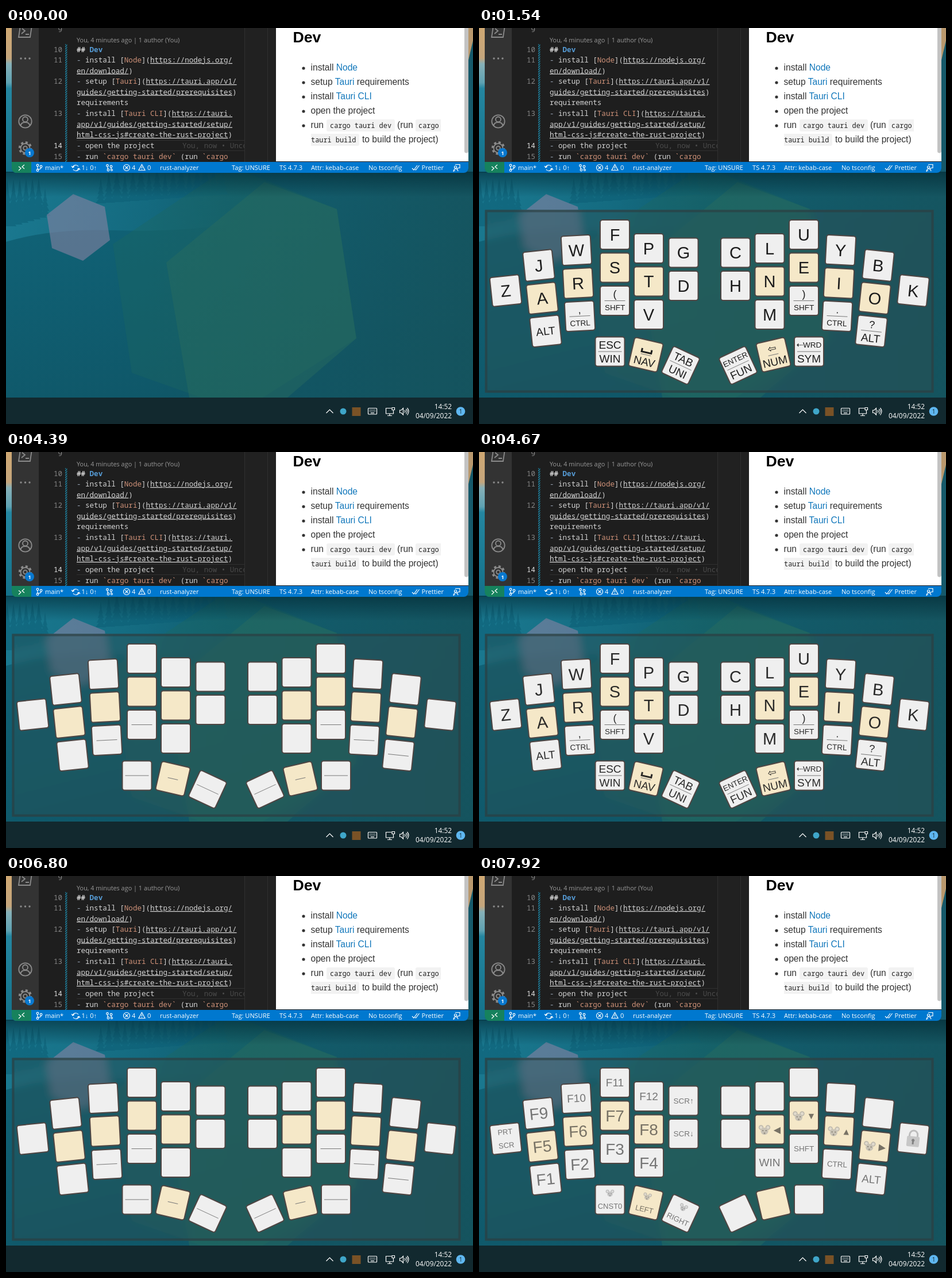
Write an HTML page that moves like this. It is 813 by 689 pixels and loops after 8000 ms.

```html
<!DOCTYPE html>
<html lang="en">
<head>
<meta charset="utf-8">
<title>Keyboard layer overlay</title>
<style>
  html, body { margin: 0; width: 100%; height: 100%; overflow: hidden; background: #0f5768; }
  svg { display: block; width: 100vw; height: 100vh; }
  text { white-space: pre; }
  .ui { font: 500 11.1px "Open Sans", sans-serif; fill: #fff; }
  .code { font: 12.55px "Noto Sans Mono", monospace; fill: #d4d4d4; }
  .num { fill: #858585; text-anchor: end; }
  .dash { fill: #9aa7b8; }
  .name { fill: #ce9178; }
  .url { text-decoration: underline 1px; text-underline-offset: 3px; text-decoration-skip-ink: none; }
  .doc { font: 15.6px "Liberation Sans", Arial, sans-serif; fill: #333; }
  .link { fill: #1177bb; }
  .inline { font: 11.9px "Noto Sans Mono", monospace; fill: #222; }
  .line { fill: none; stroke: #fff; stroke-width: 1.2; }
  .dim { stroke: #8b8b8b; stroke-width: 1.8; }
  .label { font-family: "Liberation Sans", Arial, "DejaVu Sans", sans-serif; fill: #1c1c1c; text-anchor: middle; }
</style>
</head>
<body>
<svg viewBox="0 0 813 689" preserveAspectRatio="none">
  <defs>
    <linearGradient id="sky" x2=".3" y2="1">
      <stop offset="0" stop-color="#13748b"/><stop offset=".5" stop-color="#106175"/><stop offset="1" stop-color="#0f5667"/>
    </linearGradient>
    <linearGradient id="dusk"><stop offset=".3" stop-color="#16535c" stop-opacity="0"/><stop offset="1" stop-color="#16535c" stop-opacity=".8"/></linearGradient>
    <linearGradient id="lake"><stop offset="0" stop-color="#1d7f97" stop-opacity=".75"/><stop offset="1" stop-color="#1d7f97" stop-opacity="0"/></linearGradient>
    <linearGradient id="shade" x2="0" y2="1"><stop offset="0" stop-color="#002530" stop-opacity=".6"/><stop offset="1" stop-color="#002530" stop-opacity="0"/></linearGradient>
    <linearGradient id="edge" x2="0" y2="1"><stop offset="0" stop-color="#cfa873"/><stop offset=".21" stop-color="#c4a57c"/><stop offset=".25" stop-color="#86b0b7"/><stop offset=".38" stop-color="#5fa2b2"/><stop offset=".42" stop-color="#2486a0"/><stop offset="1" stop-color="#14718a"/></linearGradient>
    <pattern id="hatch" width="4" height="4" patternUnits="userSpaceOnUse"><path d="M-1 1L1-1M0 4L4 0M3 5L5 3" stroke="#1b91b4" stroke-width="1.3"/></pattern>
    <filter id="frost" x="0" y="0" width="1" height="1"><feGaussianBlur stdDeviation="7"/></filter>
    <clipPath id="win"><path d="M10 0H805V244a8 8 0 0 1-8 8H18a8 8 0 0 1-8-8Z"/></clipPath>
    <clipPath id="pane"><path d="M57 0H415V233H57Z"/></clipPath>
    <clipPath id="glass"><rect x="10" y="316" width="782" height="319" rx="2"/></clipPath>
  </defs>

  <g id="desktop">
    <path d="M0 0H813V689H0Z" fill="url(#sky)"/>
    <path d="M0 252H400V340Q300 356 190 352T0 372Z" fill="url(#lake)"/>
    <path d="M0 0H813V689H0Z" fill="url(#dusk)"/>
    <path d="M0 0H12V250H0Z" fill="url(#edge)"/>
    <path d="M804 0H813V250H804Z" fill="#16596a"/>
    <path d="M804 0H813V22L804 60Z" fill="#b9986d"/>
    <g id="trees" fill="#0d6077" opacity=".6"></g>
    <path d="M186 376L372 252H420L576 315 610 540 447 643H340L219 600Z" fill="#1e665e" opacity=".36"/>
    <path d="M279 408L450 268 576 315 610 540 490 643H319Z" fill="#286c5e" opacity=".48"/>
    <path d="M117 289L172 311 181 369 134 405 80 383 71 325Z" fill="#8a83a4" opacity=".58"/>
    <path d="M0 250H813V294H0Z" fill="url(#shade)"/>
  </g>

  <!-- editor window -->
  <g clip-path="url(#win)">
    <path d="M10 0H805V252H10Z" fill="#1e1e1e"/>
    <path d="M10 0H57V233H10Z" fill="#333"/>
    <path d="M415 0H469V233H415Z" fill="#212121"/>
    <path d="M415.5 0V233M455.5 0V233" stroke="#303030"/>
    <path d="M470 0H805V232H470Z" fill="#fff"/>
    <path d="M798 0H805V214a3.5 3.5 0 0 1-7 0Z" fill="#c3c3c3"/>
    <path d="M103 28H106.5V233H103Z" fill="url(#hatch)"/>
    <g class="line dim">
      <path d="M25-4H45L42 16H22ZM28 1l5 4-6 5M34 11h6"/>
      <circle cx="33.5" cy="162.5" r="11.2"/><circle cx="33.5" cy="159" r="4.5"/><path d="M25.5 170q1-6 8-6t8 6"/>
      <circle cx="33.5" cy="209" r="3.3"/><circle cx="33.5" cy="209" r="8"/><circle cx="33.5" cy="209" r="10" stroke-width="3.4" stroke-dasharray="3.93"/>
    </g>
    <g fill="#8b8b8b"><circle cx="26" cy="53" r="1.7"/><circle cx="33.5" cy="53" r="1.7"/><circle cx="41" cy="53" r="1.7"/></g>
    <circle cx="41" cy="217" r="8" fill="#0878cf"/>
    <text class="ui" x="38.5" y="220.5" style="font-size:9px;font-weight:700">1</text>

    <g class="code" clip-path="url(#pane)">
      <path d="M123 195.5H415M123 213.5H415" stroke="#303030"/>
      <g class="num">
        <text x="98" y="7">9</text><text x="98" y="41.5">10</text><text x="98" y="60">11</text><text x="98" y="97">12</text>
        <text x="98" y="153">13</text><text x="98" y="208.5" fill="#e0e0e0">14</text><text x="98" y="227.5">15</text>
      </g>
      <text class="ui" x="123" y="25" style="font-size:10.9px;font-weight:400;fill:#999">You, 4 minutes ago | 1 author (You)</text>
      <text x="123" y="41.5" font-weight="700">## <tspan fill="#569cd6">Dev</tspan></text>
      <text x="123" y="60"><tspan class="dash">- </tspan>install [<tspan class="name">Node</tspan>](<tspan class="url">https://nodejs.org/</tspan></text>
      <text x="123" y="78.5"><tspan class="url">en/download/</tspan>)</text>
      <text x="123" y="97"><tspan class="dash">- </tspan>setup [<tspan class="name">Tauri</tspan>](<tspan class="url">https://tauri.app/v1/</tspan></text>
      <text x="123" y="115.5"><tspan class="url">guides/getting-started/prerequisites</tspan>)</text>
      <text x="123" y="134">requirements</text>
      <text x="123" y="153"><tspan class="dash">- </tspan>install [<tspan class="name">Tauri CLI</tspan>](<tspan class="url">https://tauri.</tspan></text>
      <text x="123" y="171.5"><tspan class="url">app/v1/guides/getting-started/setup/</tspan></text>
      <text x="123" y="190"><tspan class="url">html-css-js#create-the-rust-project</tspan>)</text>
      <text x="123" y="208.5"><tspan class="dash">- </tspan>open the project</text>
      <text x="307" y="208.5" fill="#4b4b4b">You, now • Uncommitted</text>
      <text x="123" y="227.5"><tspan class="dash">- </tspan>run <tspan class="name">`cargo tauri dev`</tspan> (run <tspan class="name">`cargo</tspan></text>
    </g>

    <g class="doc">
      <text x="499.5" y="25" style="font-size:26.7px;font-weight:700;fill:#000">Dev</text>
      <g><circle cx="518" cy="70" r="2.6"/><circle cx="518" cy="95" r="2.6"/><circle cx="518" cy="120" r="2.6"/><circle cx="518" cy="145" r="2.6"/><circle cx="518" cy="170" r="2.6"/></g>
      <text x="530.5" y="74">install <tspan class="link">Node</tspan></text>
      <text x="530.5" y="99">setup <tspan class="link">Tauri</tspan> requirements</text>
      <text x="530.5" y="124">install <tspan class="link">Tauri CLI</tspan></text>
      <text x="530.5" y="149">open the project</text>
      <g fill="#f2f2f2"><rect x="558" y="159" width="119" height="21" rx="3"/><path d="M757 159H716a3 3 0 0 0-3 3v15a3 3 0 0 0 3 3h41ZM531 184h81a3 3 0 0 1 3 3v15a3 3 0 0 1-3 3h-81Z"/></g>
      <text x="530.5" y="174">run</text><text class="inline" x="564" y="173.5">cargo tauri dev</text>
      <text x="681" y="174">(run</text><text class="inline" x="718" y="173.5">cargo</text>
      <text class="inline" x="531" y="198.5">tauri build</text><text x="620" y="199">to build the project)</text>
    </g>

    <!-- status bar -->
    <path d="M10 233H805V252H10Z" fill="#0078cf"/>
    <path d="M10 233H44V252H10Z" fill="#16825d"/>
    <g class="line">
      <path d="M22 241l4 3-4 4M32 238l-4 3.5 4 3.5"/>
      <circle cx="55" cy="239" r="1.8"/><circle cx="55" cy="247.5" r="1.8"/><circle cx="61" cy="241" r="1.8"/><path d="M55 241v5q6 0 6-3"/>
      <path d="M116 242a5.5 5 0 0 1 10-1M127 245a5.5 5 0 0 1-10 1M114 240l2 3 3-2M129 247l-2-3-3 2"/>
      <circle cx="176.5" cy="239.5" r="1.8"/><circle cx="183" cy="241" r="1.8"/><circle cx="178" cy="247" r="1.8"/><circle cx="184" cy="247" r="1.5"/><path d="M177 241v4M183 243v3"/>
      <circle cx="210" cy="243" r="5.5"/><path d="M207.5 240.5l5 5m0-5l-5 5"/>
      <path d="M236.5 237.5l5.5 10h-11ZM236.5 241v3M236.5 245v1.2"/>
      <path d="M707 244l3 3 6-8M712 246l1.5 1 6-8"/>
      <path d="M782 237.5h8v6h-3l-2 2M782 248q-3 0-3 2M779 249q1-4 4-4t4 4"/><circle cx="782.5" cy="242" r="2"/>
    </g>
    <g class="ui">
      <text x="68" y="247">main*</text><text x="131.5" y="247">1↓ 0↑</text><text x="219" y="247">4</text><text x="246" y="247">0</text>
      <text x="268" y="247">rust-analyzer</text><text x="393" y="247">Tag: UNSURE</text><text x="476" y="247">TS 4.7.3</text>
      <text x="531" y="247">Attr: kebab-case</text><text x="631" y="247">No tsconfig</text><text x="723.5" y="247">Prettier</text>
    </g>
  </g>

  <!-- taskbar -->
  <path d="M0 643H813V689H0Z" fill="#12292f"/>
  <g class="line">
    <path d="M557.5 670l6-6 6 6"/>
    <rect x="630.5" y="661.5" width="15" height="10.5" rx="1"/><path d="M633 664.5h10M633 667h10" stroke-dasharray="1.5 1.3"/><path d="M635 669.7h6"/>
    <path d="M671 661.5h-9.5v9.5h13v-4M664 674.5h8M668 671v3M672 660.5h4.5v4h-4.5ZM674.3 664.5v3"/>
    <path d="M685.5 665h2.5l3.5-3.5v11.5l-3.5-3.5h-2.5ZM694 665q2 2 0 4.5M696.5 663q3.5 4 0 8.5M698.5 661q5 6 0 12.5"/>
  </g>
  <circle cx="587" cy="667" r="5.5" fill="#3fa6c9"/>
  <rect x="602.5" y="660" width="15" height="15" fill="#7a5226"/>
  <g class="ui" text-anchor="end" style="font-size:11.9px;font-weight:400">
    <text x="776" y="663">14:52</text><text x="776" y="679">04/09/2022</text>
  </g>
  <circle cx="791.5" cy="667" r="7.8" fill="#5fb7f0"/>
  <text class="ui" x="791.5" y="670.7" text-anchor="middle" style="font-size:10px;fill:#12292f">1</text>

  <g id="panel">
    <g clip-path="url(#glass)">
      <use href="#desktop" filter="url(#frost)"/>
      <rect x="10" y="316" width="782" height="319" fill="#2c4f52" fill-opacity=".42"/>
    </g>
    <rect x="12.5" y="318.5" width="777" height="314" fill="none" stroke="#2c3d40" stroke-opacity=".62" stroke-width="4"/>
    <g id="keys"></g>
  </g>
</svg>

<script>
const LOOP = 8000;
const $ = id => document.getElementById(id);

function add(parent, tag, attrs = {}, content = "") {
  const node = document.createElementNS("http://www.w3.org/2000/svg", tag);
  for (const name in attrs) node.setAttribute(name, attrs[name]);
  node.textContent = content;
  return parent.appendChild(node);
}

function tree(x, base, height) {
  let d = "";
  for (let tier = 1; tier <= 5; tier++) {
    const y = base - height + height * tier / 5, w = height * tier * .045;
    d += `M${x} ${y - height * .32}L${x + w} ${y}H${x - w}Z`;
  }
  add($("trees"), "path", { d });
}
for (let i = 0; i < 7; i++) tree(2 + i * 11, 345 - i * 3, 72 - i * 5 + (i * 37 % 17));
for (let i = 0; i < 16; i++) tree(165 + i * 14, 305 - i, 40 + (i * 29 % 21));

// Columns of the left half: x, y, tilt, keys, left x + right x
const fingers = [
  [46.5, 457, -6, 1, 802.5], [104, 413, -6, 3, 799], [169.5, 386.5, -3, 3, 799],
  [236.5, 359.5, 0, 3, 802], [295.5, 383.5, 0, 3, 801.5], [356, 391, 0, 2, 802.5]
];
const thumbs = [[228, 563, 0, 1, 802.5], [290.5, 568.5, 13, 1, 803], [351, 587, 25, 1, 802]];
const mirror = cols => cols.map(([x, y, tilt, n, sum]) => [sum - x, y, -tilt, n]).reverse();
const columns = [...fingers, ...thumbs, ...mirror(fingers), ...mirror(thumbs)];

// "_" is blank, "a|b" has a rule between its halves, "a/b" has none
const layers = {
  base: "Z J A ALT W R ,|CTRL F S (|SHFT P T V G D ESC|WIN space|NAV TAB|UNI " +
        "C H L N M U E )|SHFT Y I .|CTRL B O ?|ALT K ENTER|FUN ⇦|NUM ⇠WRD|SYM",
  nav:  "INS _ _ ALT _ _ CTRL _ _ SHFT _ _ WIN _ _ _ _ _ " +
        "_ _ HOME ◀ _ PGDN ▼ _ PGUP ▲ _ END ▶ _ CAPS ENTER ⇦ DEL",
  num:  "_ _ _ 0 7 4 1|, 8 5 2 9 6 3 + - _ _ _ " +
        "_ _ _ _ WIN _ _ SHFT _ _ CTRL _ _ ALT _ _ _ _",
  fun:  "PRT/SCR F9 F5 F1 F10 F6 F2 F11 F7 F3 F12 F8 F4 SCR↑ SCR↓ mouse/CNST0 mouse/LEFT mouse/RIGHT " +
        "_ _ _ mouse◀ WIN _ mouse▼ SHFT _ mouse▲ CTRL _ mouse▶ ALT lock _ _ _"
};

const sizeOf = text => [0, 29, 28, 19][text.length] || 13.5;

function write(parent, text, x, y, size) {
  add(parent, "text", { class: "label", x, y: y + size * .36, "font-size": size }, text);
}

function mouse(parent, x, y, scale) {
  const g = add(parent, "g", { transform: `translate(${x} ${y}) scale(${scale})` });
  for (const side of [-1, 1]) {
    add(g, "circle", { cx: side * 6, cy: -4.5, r: 4.2, fill: "#999" });
    add(g, "circle", { cx: side * 6, cy: -4.5, r: 2.5, fill: "#d0d0d0" });
  }
  add(g, "ellipse", { cy: 2, rx: 6.5, ry: 6.2, fill: "#a8a8a8" });
  for (const side of [-1, 1]) add(g, "circle", { cx: side * 2.8, cy: 1, r: 1.1, fill: "#333" });
  add(g, "circle", { cy: 5.5, r: 1.5, fill: "#555" });
}

function drawLabel(lines, text, label, isThumb) {
  if (label === "_") return;
  if (label === "lock") {
    add(text, "path", { d: "M-7-3V-7a7 7 0 0 1 14 0v4", fill: "none", stroke: "#999", "stroke-width": 3 });
    add(text, "rect", { x: -11, y: -4, width: 22, height: 18, rx: 2, fill: "#aaa" });
    add(text, "path", { d: "M-1.5 10V5a2.5 2.5 0 1 1 3 0v5Z", fill: "#333" });
  } else if (label.includes("|")) {
    const [top, bottom] = label.split("|");
    const isIcon = top === "space" || top === "⇦";
    const half = isIcon ? 9 : isThumb ? 20.5 : 18;
    add(lines, "path", { d: `M${-half} 0H${half}`, stroke: "#777" });
    if (top === "space") add(text, "path", { d: "M-8.5-10v6h17v-6", fill: "none", stroke: "#1c1c1c", "stroke-width": 3 });
    else write(text, top, 0, -11.5, top.length < 2 ? 18 : sizeOf(top));
    write(text, bottom, 0, 12, Math.min(19, sizeOf(bottom)));
  } else if (label.includes("/")) {
    const [top, bottom] = label.split("/");
    if (top === "mouse") mouse(text, 0, -11, .72);
    else write(text, top, 0, -12, 13);
    write(text, bottom, 0, 11.5, 13);
  } else if (label.startsWith("mouse")) {
    mouse(text, -9, 1, 1);
    write(text, label.slice(5), 13, 0, 16);
  } else write(text, label, 0, 0, sizeOf(label));
}

const slots = columns.flatMap(([x, y, tilt, count]) => {
  const rad = tilt * Math.PI / 180, isThumb = y > 520;
  return Array.from({ length: count }, (_, i) => ({
    at: `translate(${x - 57.5 * i * Math.sin(rad)} ${y + 57.5 * i * Math.cos(rad)}) rotate(${tilt})`,
    isHome: count === 3 && i === 1 || isThumb && Math.abs(tilt) === 13,
    isThumb
  }));
});

const caps = slots.map(({ at, isHome }) => add($("keys"), "rect", {
  transform: at, x: -25.5, y: -25.5, width: 51, height: 51, rx: 4,
  fill: isHome ? "#f5e8c8" : "#efefef", stroke: "#4e4543", "stroke-width": 2
}));
const outerCap = caps[32];

const groups = {};
for (const name in layers) {
  const root = add($("keys"), "g"), lines = add(root, "g"), text = add(root, "g");
  layers[name].split(" ").forEach((label, i) => {
    const { at, isThumb } = slots[i];
    drawLabel(add(lines, "g", { transform: at }), add(text, "g", { transform: at }), label, isThumb);
  });
  groups[name] = { root, text };
}

// Switch time, layer, fade start, fade end, final opacity
const switches = [
  [0, "fun", 0, 1, 1], [1240, "base", 1240, 1540, 1], [3340, "nav", 3350, 3540, 1],
  [4390, "base", 4390, 4690, 1], [5640, "num", 5750, 5920, 1],
  [6800, "base", 6820, 7010, 1], [7760, "fun", 7760, 7920, .58]
];
const ramp = (t, from, to) => Math.min(1, Math.max(0, (t - from) / (to - from)));

function render(t) {
  const open = 1 - (1 - ramp(t, 740, 940)) ** 2, scale = .93 + .07 * open;
  $("panel").setAttribute("opacity", open);
  $("panel").setAttribute("transform", `translate(401 474.5) scale(${scale}) translate(-401 -474.5)`);
  const [, current, from, to, peak] = switches.findLast(([start]) => t >= start);
  for (const name in groups) groups[name].root.setAttribute("display", name === current ? "inline" : "none");
  groups[current].text.setAttribute("opacity", peak * ramp(t, from, to));
  outerCap.setAttribute("stroke-opacity", current === "nav" ? .45 + .55 * ramp(t, 3340, 3540) : 1);
}

const start = performance.now();
function tick() {
  render((performance.now() - start) % LOOP);
  requestAnimationFrame(tick);
}
tick();
</script>
</body>
</html>
```
